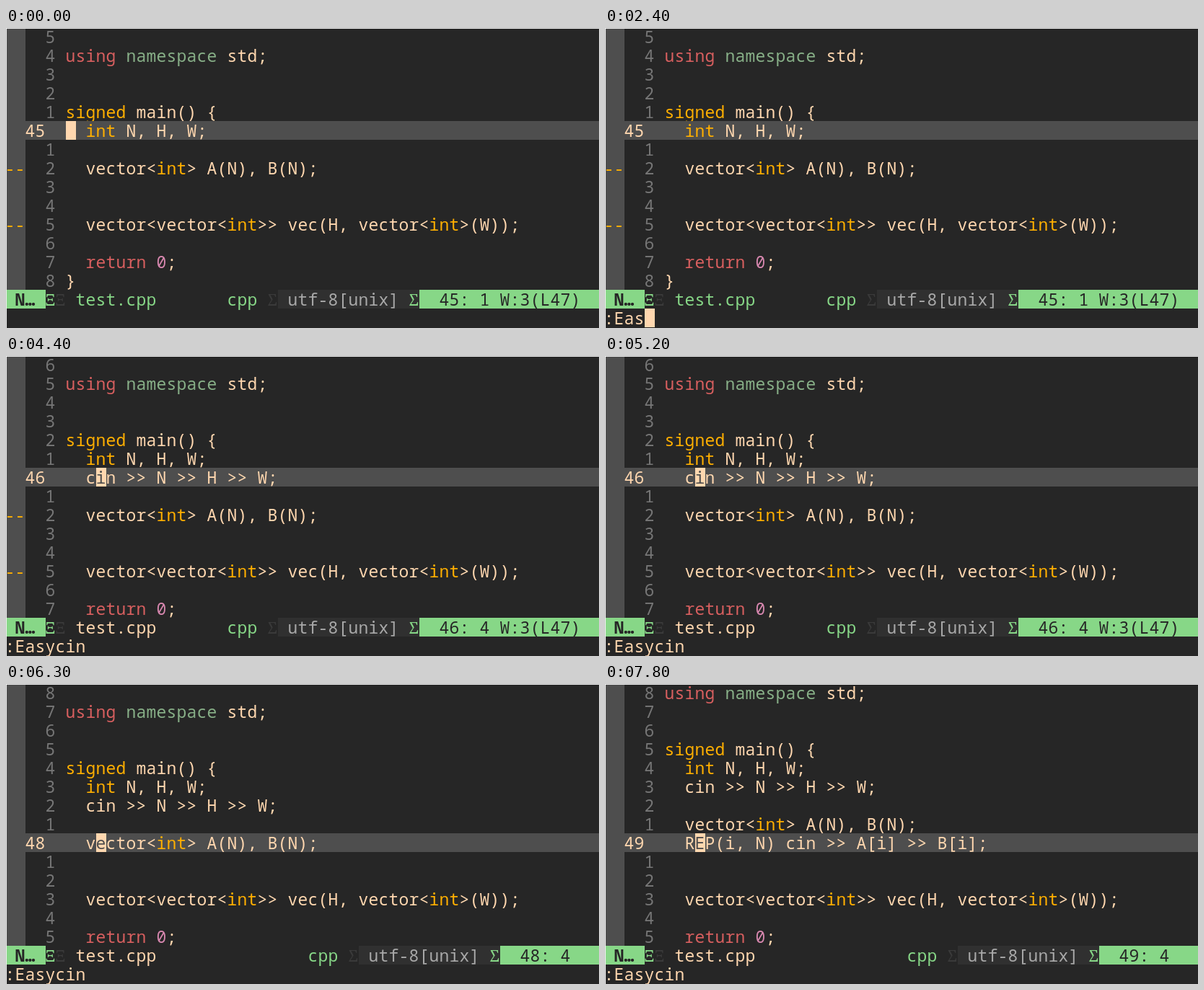
Write an HTML page with a canvas that moves like this. It is 822 px wide and 416 px high and loops after 8 s.

```html
<!DOCTYPE html>
<html lang="en">
<head>
<meta charset="utf-8">
<title>Vim session</title>
<style>
html, body { margin: 0; width: 822px; height: 416px; overflow: hidden; background: #262626; }
canvas { display: block; }
</style>
</head>
<body>
<canvas id="term" width="822" height="416"></canvas>
<script>
const ctx = document.getElementById('term').getContext('2d');
const CW = 14, RH = 26, X0 = -1, Y0 = -1, LOOP = 8000;
const BG = '#262626', LINE = '#4e4e4e', CREAM = '#ffd7af', GREEN = '#87d787', NUM = '#767676',
      PANEL = '#303030', FAINT = '#3a3a3a', GREY = '#a8a8a8', YELLOW = '#ffaf00',
      RED = '#d75f5f', AQUA = '#87af87', PINK = '#d787af';
const MONO = '23px "Noto Sans Mono", "DejaVu Sans Mono", monospace';
const SERIF = '22px "Noto Serif", serif';
const KEYWORDS = { using: RED, return: RED, namespace: AQUA, signed: YELLOW, int: YELLOW, 0: PINK };

const start = [
  '', 'using namespace std;', '', '', 'signed main() {', '  int N, H, W;', '',
  '  vector<int> A(N), B(N);', '', '', '  vector<vector<int>> vec(H, vector<int>(W));',
  '', '  return 0;', '}'
];
const insert = (lines, at, text) => [...lines.slice(0, at), text, ...lines.slice(at)];
const withCin = insert(start, 6, '  cin >> N >> H >> W;');
const withRep = insert(withCin, 9, '  REP(i, N) cin >> A[i] >> B[i];').slice(1);

// Editor states; each entry overrides the one before it.
const CMD = ':Easycin';
const steps = [
  [0, { lines: start, row: 5, col: 0, line: 45, signs: [7, 10], warn: true, saved: true, cmd: '', typing: false }],
  [500, { cmd: ':', typing: true }],
  ...[1600, 2000, 2400, 2800, 3200, 3500, 3900].map((t, i) => [t, { cmd: CMD.slice(0, i + 2) }]),
  [4400, { lines: withCin, row: 6, col: 3, line: 46, signs: [8, 11], saved: false, typing: false }],
  [5200, { signs: [] }],
  [5700, { row: 7, col: 0, line: 47, warn: false }],
  [6300, { row: 8, col: 3, line: 48 }],
  [6800, { cmd: ':', typing: true }],
  [7100, { cmd: CMD }],
  [7800, { lines: withRep, line: 49, typing: false }]
];

function fill(col, row, cells, color) {
  ctx.fillStyle = color;
  ctx.fillRect(X0 + col * CW, Y0 + row * RH, cells * CW, RH);
}

function put(text, col, row, color, font = '500 ' + MONO) {
  ctx.font = font;
  ctx.fillStyle = color;
  [...text].forEach((ch, i) => {
    if (ch !== ' ') ctx.fillText(ch, X0 + (col + i + 0.5) * CW - 0.6, Y0 + row * RH + 22);
  });
}

function putCode(text, row) {
  let col = 6;
  for (const part of text.split(/(\b\w+\b)/)) {
    put(part, col, row, KEYWORDS[part] || CREAM);
    col += part.length;
  }
}

function cursor(col, row, ch = ' ') {
  fill(col, row, 1, CREAM);
  put(ch, col, row, LINE);
}

function statusBar(s) {
  const row = 14, shift = s.warn ? 0 : 8;
  fill(0, row, 4, GREEN);
  put('N…', 1, row, BG, '600 ' + MONO);
  put('Ξ', 4, row, GREEN, SERIF);
  put('Ξ', 5, row, FAINT, SERIF);
  put('test.cpp', 7, row, s.saved ? GREEN : CREAM);
  put('cpp', 22 + shift, row, GREEN);
  put('Σ', 26 + shift, row, FAINT, SERIF);
  fill(27 + shift, row, 14, PANEL);
  put('utf-8[unix]', 28 + shift, row, GREY);
  put('Σ', 40 + shift, row, GREEN, SERIF);
  fill(41 + shift, row, 20, GREEN);
  put(`${s.line}: ${s.col + 1}` + (s.warn ? ' W:3(L47)' : ''), 43 + shift, row, BG);
}

function draw(s) {
  ctx.textAlign = 'center';
  ctx.fillStyle = BG;
  ctx.fillRect(0, 0, 822, 416);
  for (let r = 0; r < 14; r++) {
    const here = r === s.row, text = s.lines[r];
    fill(0, r, 2, LINE);
    if (here) fill(2, r, 60, LINE);
    if (s.signs.includes(r)) put('--', 0, r, YELLOW);
    if (here) put(String(s.line), 2, r, CREAM);
    else put(String(Math.abs(r - s.row)), 4, r, NUM);
    putCode(text, r);
    if (here && !s.typing) cursor(6 + s.col, r, text[s.col]);
  }
  statusBar(s);
  put(s.cmd, 0, 15, CREAM);
  if (s.typing) cursor(s.cmd.length, 15);
  ctx.fillStyle = '#f0f0f0';
  ctx.fillRect(0, 0, 822, 1);
  ctx.fillRect(0, 0, 1, 416);
}

function stateAt(t) {
  return Object.assign({}, ...steps.filter(([at]) => at <= t).map(([, change]) => change));
}

let origin;
function tick(now) {
  origin ??= now;
  draw(stateAt((now - origin) % LOOP));
  requestAnimationFrame(tick);
}
draw(stateAt(0));
requestAnimationFrame(tick);
</script>
</body>
</html>
```
